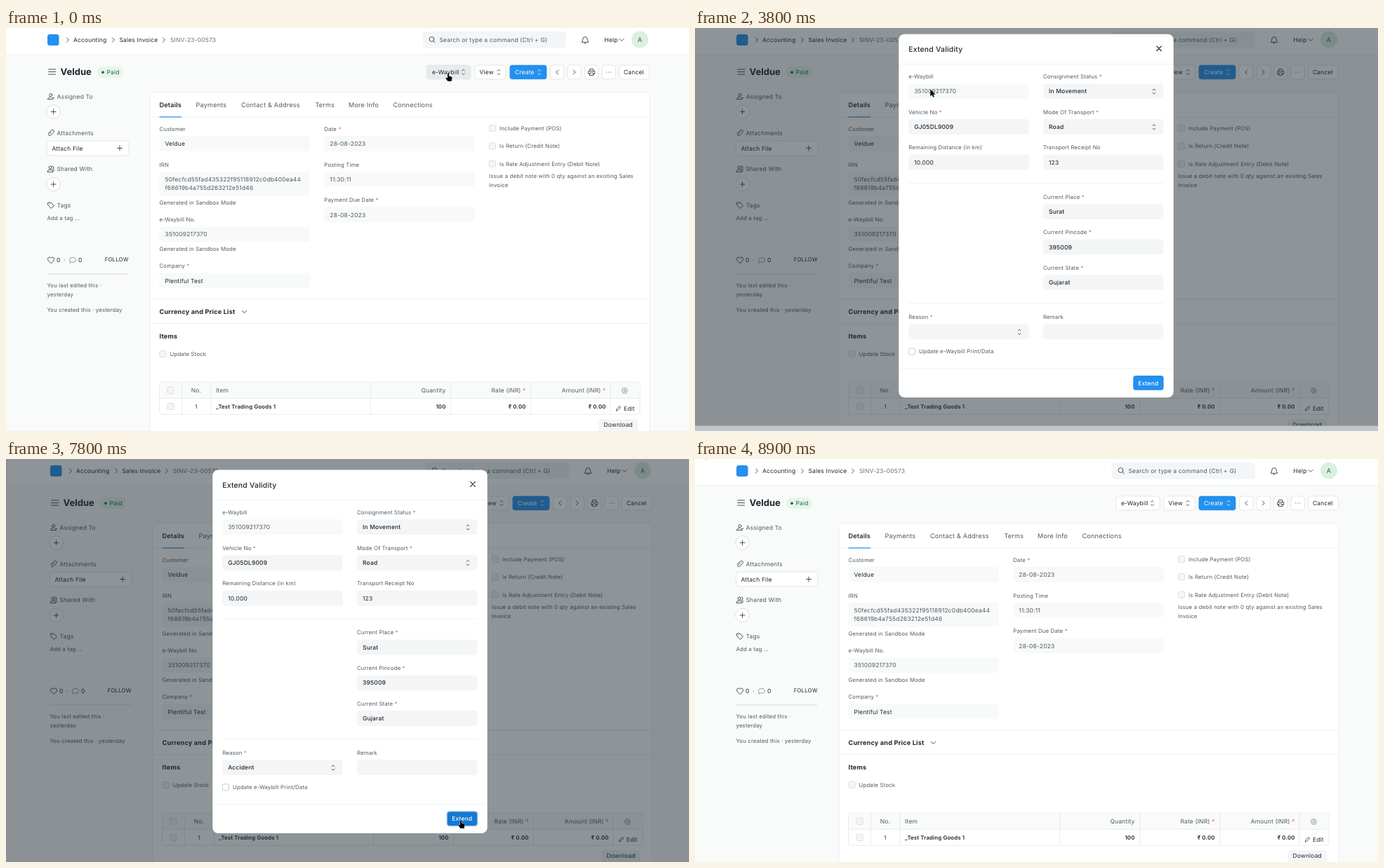
These frames come from a looping animation (973x575 px, 9 s). An HTML page:

```html
<!DOCTYPE html>
<html lang="en">
<head>
<meta charset="utf-8">
<title>Extend validity</title>
<style>
html, body { margin: 0; width: 100%; height: 100%; overflow: hidden; background: #f9fafa; }
svg { display: block; width: 973px; height: 575px; }
text { font: 8.47px Inter, sans-serif; letter-spacing: .02em; fill: #1f272e; white-space: pre; text-rendering: geometricPrecision; }
.sm { font-size: 7.82px; }
.lg { font-size: 9.13px; }
.xl { font-size: 10.43px; }
.title { font-size: 13.04px; letter-spacing: 0; }
.native { font: 9.13px "Liberation Sans", Arial, sans-serif; letter-spacing: 0; }
.link { font: 7.8px "Liberation Sans", Arial, sans-serif; letter-spacing: 0; }
.m { font-weight: 500; }
.b { font-weight: 600; }
.bb { font-weight: 700; }
.grey { fill: #505a62; }
.mute { fill: #687178; }
.white { fill: #fff; }
.green { fill: #286840; }
.red { fill: #f15b5b; }
.end { text-anchor: end; }
.mid { text-anchor: middle; }
.ico { fill: none; stroke: #36414c; stroke-width: .9; stroke-linecap: round; stroke-linejoin: round; }
.cursor { stroke: #fff; stroke-width: .7; paint-order: stroke; }
#menu { filter: drop-shadow(0 2px 4px #0003); }
#list { filter: drop-shadow(1px 1px 1.5px #0006); }
</style>
</head>
<body>
<svg id="stage" viewBox="0 0 973 575"></svg>
<script>
const SIZES = { sm: 7.82, lg: 9.13, xl: 10.43, title: 13.04, native: 9.13, link: 7.8 };
const ACCENT = '#2490ef', LINE = '#ebeef0', EDGE = '#dde1e5', FIELD = '#f4f5f6', LOCKED = '#f8f9f9';

// Text is placed by the middle of its capitals.
const text = (x, cy, s, cls = '') => {
  const size = SIZES[cls.split(' ')[0]] || 8.47;
  return `<text x="${x}" y="${cy + size * .364}" class="${cls}">${s}</text>`;
};
const box = (x, y, x2, y2, fill, r = 4, more = '') =>
  `<rect x="${x}" y="${y}" width="${x2 - x}" height="${y2 - y}" rx="${r}" fill="${fill}" ${more}/>`;
const edged = (x, y, x2, y2, fill = '#fff', r = 4, edge = EDGE, more = '') =>
  box(x, y, x2, y2, fill, r, `stroke="${edge}" stroke-width=".8" ${more}`);
const icon = (x, y, d, more = '') => `<path class="ico" transform="translate(${x} ${y})" d="${d}" ${more}/>`;
const hline = (x, x2, y, color = LINE) => box(x, y - .4, x2, y + .4, color, 0);
const star = '<tspan class="red"> *</tspan>';
const label = (x, cy, s) => text(x, cy, s.replace(' *', star), 'sm grey');
const check = (x, cy, s, edge = '#d3d8dc', fill = '#f4f5f6') =>
  edged(x + .4, cy - 4.6, x + 9.6, cy + 4.6, fill, 2, edge) + (s ? text(x + 15, cy, s, 'sm grey') : '');
const group = (id, body) => `<g id="${id}">${body}</g>`;

const CHEVRON = 'M-1.5-3l3 3-3 3', DOWN = 'M-3-1.5l3 3 3-3', PLUS = 'M-3.5 0h7M0-3.5v7';
const UPDOWN = 'M-1.9-1.8l1.9-1.9 1.9 1.9M-1.9 1.8l1.9 1.9 1.9-1.9';

function header() {
  return box(0, 0, 973, 38, '#fff', 0) + hline(0, 973, 38) +
    box(59, 9, 75.5, 25, ACCENT, 3.5) +
    [88, 153, 225].map(x => icon(x, 17, CHEVRON)).join('') +
    text(96, 17, 'Accounting') + text(161.5, 17, 'Sales Invoice') + text(234, 17, 'SINV-23-00573', 'md mute') +
    box(593.5, 5, 798, 28.5, FIELD, 5) +
    icon(607, 16.5, 'M2.9-.5a3.4 3.4 0 1 1-6.8 0a3.4 3.4 0 1 1 6.8 0M2 2l2.2 2.4') +
    text(617.5, 17, 'Search or type a command (Ctrl + G)', 'md grey') +
    icon(825, 17, 'M-4.6 3q1.4-1.4 1.4-4a3.2 3.4 0 0 1 6.4 0q0 2.6 1.4 4zM-1.3 4.7q1.3 1 2.6 0') +
    text(852.5, 17, 'Help') + icon(877, 17, DOWN) +
    '<circle cx="903" cy="16.5" r="12" fill="#daf0e1"/>' + text(903, 17, 'A', 'lg mid green');
}

function toolbar() {
  const arrow = (x, d) => edged(x, 53, x + 19.5, 73) + icon(x + 9.7, 63, d);
  return icon(65.7, 62.5, 'M-5-3.6h10M-5 0h10M-5 3.6h10') +
    text(77.5, 62.3, 'Veldue', 'title bb') +
    box(130, 55, 167, 71, '#e6f5eb', 8) + '<circle cx="138" cy="63.2" r="1.9" fill="#286840"/>' +
    text(143.5, 63, 'Paid', 'md green') +
    edged(599.5, 53, 662, 73, '#fff', 4, EDGE, 'id="waybill"') + text(607, 63, 'e-Waybill') + icon(651.5, 63, UPDOWN) +
    edged(667.5, 53, 712, 73) + text(674.5, 63, 'View') + icon(702, 63, UPDOWN) +
    box(717.5, 52.8, 770.4, 73.2, ACCENT) + text(725, 63, 'Create', 'md white') + icon(760, 63, UPDOWN, 'style="stroke:#fff"') +
    arrow(775.5, 'M1.5-3l-3 3 3 3') + arrow(800, CHEVRON) +
    arrow(824.5, 'M-2.5-1.5v-3h5v3M-2.5 2.5h-2v-4h9v4h-2M-2.5 1h5v3.5h-5z') +
    arrow(849, 'M-3 0h.1M0 0h.1M3 0h.1') +
    edged(873.5, 53, 916.5, 73) + text(880, 63, 'Cancel');
}

function sidebar() {
  const plus = cy => `<circle cx="67.6" cy="${cy}" r="9.8" fill="#fff" stroke="#d3d9de" stroke-width=".8"/>` + icon(67.6, cy, PLUS);
  const heads = [
    ['Assigned To', 97.5, 'M1.8-2a2 2 0 1 1-4 0a2 2 0 1 1 4 0M-4.5 4q0-3 4-3M-4.5 4h8M1.5 2h3'],
    ['Attachments', 149.5, 'M-4 1l4.5-4.5q2-1.5 3.3 0t-.3 3.3l-4 4q-1.5 1-2.3 0t.2-2l3.3-3.3'],
    ['Shared With', 201, 'M1-2a2 2 0 1 1-4 0a2 2 0 1 1 4 0M-5 4q0-3 4-3t4 3zM2-4q2 .2 2 2t-1.5 2q2 .5 2 3'],
    ['Tags', 253, 'M-4-4h4l4.5 4.5-4 4-4.5-4.5zM-2-2h.1']
  ];
  return heads.map(([s, cy, d]) => icon(64, cy, d) + text(72.5, cy, s, 'md grey')).join('') +
    plus(119.5) + edged(58.4, 161, 174.8, 182) + text(65.5, 171.5, 'Attach File') + icon(162, 171.5, PLUS) + plus(223) +
    text(58.5, 271.5, 'Add a tag ...', 'sm grey') +
    icon(64, 331, 'M0 4.5l-4-4q-1.5-2.5.5-4t3.5.8q1.5-2.3 3.5-.8t.5 4z') + text(72, 330.5, '0') + text(82, 330.5, '·') +
    icon(95, 331, 'M-4 2.5v1.8l2-1.3h4q2.3 0 2.3-3t-2.3-3.5h-3q-3.5 0-3.5 3.5 0 1.5.5 2.5', 'style="stroke:#8d99a6"') +
    text(103, 330.5, '0') + text(174.5, 330.5, 'FOLLOW', 'sm end') +
    hline(58.5, 174.5, 351, '#cfd5da') +
    text(58.5, 367.5, 'You last edited this ·', 'sm grey') + text(58.5, 380.2, 'yesterday', 'sm grey') +
    text(58.5, 402, 'You created this · yesterday', 'sm grey');
}

function form() {
  const tabs = [['Payments', 270.5], ['Contact &amp; Address', 335], ['Terms', 440.5], ['More Info', 488], ['Connections', 551.5]];
  const field = (x, cy, name, value, cls = 'md grey') =>
    label(x, cy, name) + box(x, cy + 10, x + 214.5, cy + 31.7, LOCKED) + text(x + 8, cy + 21, value, cls);
  return edged(205, 92, 917, 590, '#fff', 5, '#e6eaed') +
    text(218.5, 109.3, 'Details', 'lg b') + tabs.map(([s, x]) => text(x, 109.3, s, 'lg grey')).join('') +
    hline(205, 917, 127.3) + box(218.5, 126.3, 250, 127.5, ACCENT, 0) +
    field(218.5, 144, 'Customer', 'Veldue', 'md') +
    label(218.5, 195, 'IRN') + box(218.5, 205, 433, 239.5, LOCKED) +
    text(226.5, 215.5, '50fecfcd55fad435322f95118912c0db400ea44', 'md grey') +
    text(226.5, 228.3, 'f68619b4a755d263212e51d46', 'md grey') +
    label(218.5, 248.7, 'Generated in Sandbox Mode') +
    field(218.5, 273.4, 'e-Waybill No.', '351009217370') +
    label(218.5, 315, 'Generated in Sandbox Mode') +
    field(218.5, 339.5, 'Company *', 'Plentiful Test', 'md') +
    field(453.3, 144, 'Date *', '28-08-2023') +
    field(453.3, 194.8, 'Posting Time', '11:30:11') +
    field(453.3, 245.5, 'Payment Due Date *', '28-08-2023') +
    check(688, 143, 'Include Payment (POS)') + check(688, 168.3, 'Is Return (Credit Note)') +
    check(688, 193.7, 'Is Rate Adjustment Entry (Debit Note)') +
    label(688, 211, 'Issue a debit note with 0 qty against an existing Sales') + label(688, 224, 'Invoice') +
    hline(205, 917, 386.5) + text(218.5, 404.8, 'Currency and Price List', 'lg bb') + icon(339.5, 405, DOWN) +
    hline(205, 917, 421.5) + text(218.5, 440, 'Items', 'lg bb') + check(218.5, 465, 'Update Stock') + table();
}

function table() {
  const columns = [250.5, 292, 519.5, 633.5, 747.5, 861];
  return edged(218.5, 505, 903, 551.3, '#fff', 3, '#e2e6e9') + box(219, 505.4, 902.6, 528, '#f9fafa', 3) +
    hline(218.5, 903, 528.2, '#e2e6e9') + columns.map(x => box(x - .4, 505, x + .4, 551.3, '#e2e6e9', 0)).join('') +
    check(229.5, 517) + check(229.5, 540) +
    text(271, 517, 'No.', 'md mid grey') + text(299, 517, 'Item', 'md grey') + text(626.5, 517, 'Quantity', 'md end grey') +
    text(740.5, 517, 'Rate (INR)' + star, 'md end grey') + text(854.5, 517, 'Amount (INR)' + star, 'md end grey') +
    icon(881.5, 517.5, 'M-2-3.5h4l2 3.5-2 3.5h-4l-2-3.5zM1.3 0a1.3 1.3 0 1 1-2.6 0a1.3 1.3 0 1 1 2.6 0', 'style="stroke:#7c868e"') +
    text(271, 540, '1', 'sm mid') + text(299, 540, '_Test Trading Goods 1', 'sm b') + text(626.5, 540, '100', 'sm end b') +
    text(740.5, 540, '₹ 0.00', 'sm end b') + text(854.5, 540, '₹ 0.00', 'sm end b') +
    icon(872.5, 542.5, 'M-3 3.3l.5-2.3 4-4 1.7 1.7-4 4z') + text(880, 542.5, 'Edit') +
    box(844.5, 558, 900, 580, FIELD) + text(872.2, 566.3, 'Download', 'md mid');
}

function menu() {
  const items = ['Update Vehicle Info', 'Update Transporter', 'Extend Validity', 'Mark as Cancelled', 'Print', 'Attach'];
  return edged(600.4, 75, 735, 241, '#fff', 4, '#e2e6e9') + box(603, 131, 732.5, 158, FIELD, 4, 'id="menuRow"') +
    items.map((s, i) => text(610, 91 + 26.95 * i, s)).join('');
}

function dialog() {
  const L = 308.2, R = 500, W = 171.4;
  const field = (x, cy, name, value, cls = 'md m', select = false, fill = FIELD) =>
    label(x, cy, name) + box(x, cy + 10.2, x + W, cy + 32, fill) + text(x + 8, cy + 21.2, value, cls) +
    (select ? icon(x + 158, cy + 21.5, UPDOWN) : '');
  return box(294.3, 15.5, 685.7, 534, '#fff', 8) +
    text(308.2, 37, 'Extend Validity', 'xl m') + icon(665, 36, 'M-3.3-3.3l6.6 6.6M3.3-3.3l-6.6 6.6', 'style="stroke:#1f272e;stroke-width:1.2"') +
    hline(294.3, 685.7, 58.5) +
    field(L, 76, 'e-Waybill', '351009217370', 'md grey', false, LOCKED) +
    field(R, 76, 'Consignment Status *', 'In Movement', 'md m', true) +
    field(L, 126.7, 'Vehicle No *', 'GJ05DL9009') + field(R, 126.7, 'Mode Of Transport *', 'Road', 'md m', true) +
    field(L, 177.4, 'Remaining Distance (in km)', '10.000', 'md') + field(R, 177.4, 'Transport Receipt No', '123', 'md') +
    hline(L, R + W, 228) +
    field(R, 247.6, 'Current Place *', 'Surat') + field(R, 298.2, 'Current Pincode *', '395009') +
    field(R, 348.9, 'Current State *', 'Gujarat') +
    hline(L, R + W, 399.7) +
    field(L, 419, 'Reason *', '<tspan id="reason"></tspan>', 'md m', true) + field(R, 419, 'Remark', '', 'md') +
    box(307.7, 428.8, 480, 451.6, 'none', 4.5, 'id="focus" stroke="#c4cad0"') +
    check(308, 468.4, 'Update e-Waybill Print/Data', '#b8c0c7', '#fff') + hline(294.3, 685.7, 493) +
    box(628.2, 502.9, 671.6, 523.6, ACCENT, 4, 'id="extend"') + text(649.8, 513.4, 'Extend', 'md m white mid') +
    group('list', edged(308.6, 452, 479.4, 508.5, FIELD, 0, '#555') + box(309, 0, 479, 11.2, '#50a0c9', 0, 'id="listRow"') +
      OPTIONS.map((s, i) => text(317, 457.7 + 11.2 * i, s, 'native option')).join(''));
}

const OPTIONS = ['Natural Calamity', 'Law and Order Situation', 'Transshipment', 'Accident', 'Others'];
const stage = document.getElementById('stage');
stage.innerHTML =
  group('page', toolbar() + sidebar() + form() + header()) +
  group('menu', menu()) +
  group('status', edged(-4, 562.5, 85, 580, '#dcdfe2', 2, '#a5aaae') + text(81, 569, 'nvoice/SINV-23-00573#', 'link end')) +
  box(0, 0, 973, 575, '#1f2a30', 0, 'id="shade"') +
  box(0, 567.6, 973, 575, '#c0c6cc', 0, 'id="bar"') +
  group('dialog', dialog()) +
  '<path id="hand" class="cursor" d="M3 .9Q3.9-.4 4.8.9V4.5L8.6 5.4Q9.7 5.8 9.5 7.2L8.6 12H3.4L.4 7.7Q.5 6.3 2 6.9L3 7.7Z"/>' +
  '<path id="arrow" class="cursor" d="M0 0V10.2L2.3 8.1 4 11.6 5.7 10.8 4.1 7.5H7.3Z"/>';

const ui = Object.fromEntries([...stage.querySelectorAll('[id]')].map(e => [e.id, e]));
const optionTexts = [...stage.querySelectorAll('.option')];

// Pointer stops: time, x, y.
const PATH = [
  [0, 626, 64], [300, 622, 70], [600, 625, 63], [1400, 625, 63], [2200, 626, 149], [3700, 626, 149],
  [3800, 335.2, 87.2], [3900, 335.2, 87.2], [4000, 365, 125], [4100, 365, 125], [4300, 417, 191], [4400, 417, 191],
  [4500, 430, 228], [4600, 430, 228], [5000, 372, 441], [5100, 372, 441], [5400, 368, 460.8], [5900, 361, 488],
  [6000, 361, 488], [6100, 361, 489.5], [6300, 361, 489.5], [6600, 524, 504], [6700, 524, 504], [7000, 628, 510],
  [7200, 628, 510], [7500, 644, 515], [7800, 644, 515], [8100, 191, 115.5], [8700, 13.5, -5], [8800, 13.5, -5], [8900, 12, -11]
];
function pointer(t) {
  const i = PATH.findIndex(p => p[0] > t);
  if (i < 0) return PATH[PATH.length - 1].slice(1);
  const [t0, x0, y0] = PATH[i - 1], [t1, x1, y1] = PATH[i], k = (t - t0) / (t1 - t0);
  return [x0 + (x1 - x0) * k, y0 + (y1 - y0) * k];
}

const show = (el, on) => el.style.display = on ? '' : 'none';
const move = (el, x, y) => el.setAttribute('transform', `translate(${x} ${y})`);

function draw(now) {
  const t = Math.floor(now % 9000 / 100) * 100;
  const during = (a, b) => t >= a && t < b;
  const [x, y] = pointer(t);

  const isHand = t < 3800 || during(7300, 7900);
  show(ui.hand, isHand);
  show(ui.arrow, !isHand);
  move(isHand ? ui.hand : ui.arrow, x, y);

  ui.waybill.setAttribute('fill', during(1200, 1300) ? '#d6dbdf' : t < 1500 ? '#e8ebed' : '#fff');
  const row = during(1500, 3800) ? Math.floor((y - 77.5) / 26.95) : -1;
  show(ui.menu, during(1300, 3800));
  show(ui.menuRow, row >= 0);
  move(ui.menuRow, 0, (row - 2) * 26.95);
  show(ui.status, row >= 0);

  const closing = t === 8000;
  move(ui.page, during(4200, 8100) ? 4 : 0, 0);
  ui.shade.setAttribute('opacity', during(3800, 8100) ? .5 : t === 8100 ? .19 : 0);
  show(ui.bar, during(3800, 4200) || t === 8100);
  ui.bar.setAttribute('fill', t === 8100 ? '#ced5da' : '#c0c6cc');
  show(ui.dialog, during(3800, 8100));
  ui.dialog.setAttribute('opacity', closing ? .4 : 1);
  move(ui.dialog, t < 4200 ? -4 : 0, t < 4000 ? -6.8 : closing ? -20 : 0);

  const option = Math.max(0, Math.floor((y - 452.5) / 11.2));
  show(ui.focus, during(5200, 6800));
  show(ui.list, during(5200, 6400));
  move(ui.listRow, 0, 452.3 + 11.2 * option);
  optionTexts.forEach((el, i) => el.classList.toggle('white', i === option));
  ui.reason.textContent = t >= 6400 ? OPTIONS[3] : '';

  const pressed = t >= 7800;
  ui.extend.setAttribute('fill', pressed ? '#1579d0' : ACCENT);
  ui.extend.setAttribute('stroke', pressed ? '#8fc4f5' : 'none');
  ui.extend.setAttribute('stroke-width', 1.3);
  requestAnimationFrame(loop);
}
const loop = () => draw(performance.now());
loop();
</script>
</body>
</html>
```
